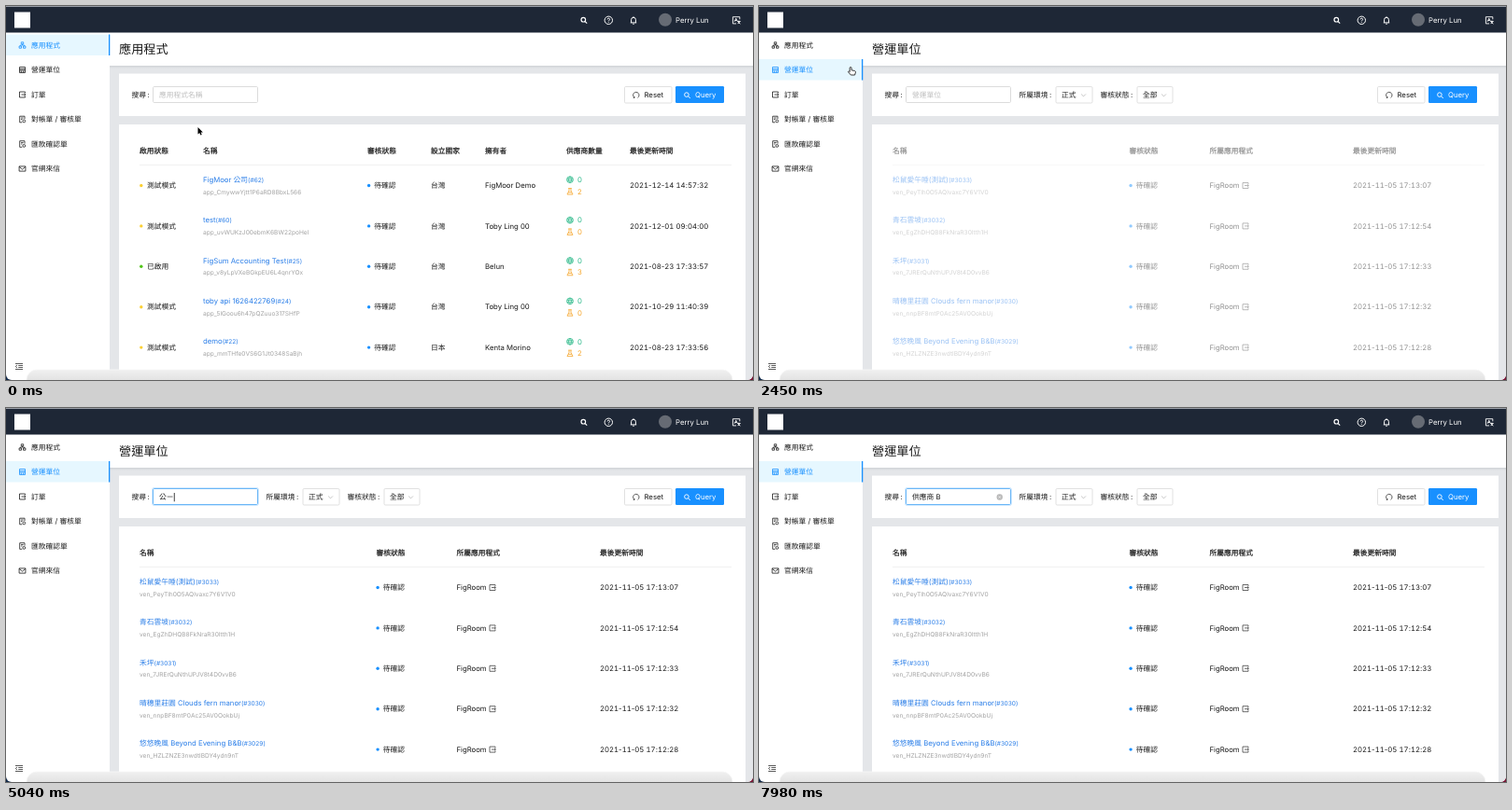
An HTML page for the animation above (8000 ms loop, 800x401 px).

```html
<!DOCTYPE html>
<html lang="zh-Hant">
<head>
<meta charset="utf-8">
<title>營運單位</title>
<style>
  html, body { margin: 0; width: 100%; height: 100%; overflow: hidden; background: #fff; }
  svg { display: block; width: 800px; height: 401px; }
  text {
    font-family: Inter, "Noto Sans CJK TC", "Noto Sans CJK JP", "Noto Sans CJK", sans-serif;
    text-rendering: geometricPrecision;
    white-space: pre;
  }
  .digits { font-variant-numeric: tabular-nums; }
</style>
</head>
<body>
<svg id="stage" viewBox="0 0 800 401"></svg>
<script>
const LOOP = 8000, BODY = 7.75, INK = '#1a1a1a', BLUE = '#1890ff', LINK = '#2a7ee8';
const ROW_TOP = 192.5, ROW_STEP = 43.4;
const MENU_TOP = 42, MENU_STEP = 26.5;

const PATHS = {
  apps: 'M-1.2-3.2h2.4v2h-2.4zM-3.4 1h2.4v2.2h-2.4zM1 1h2.4v2.2H1zM0-1.2V0M-2.2 1V0H2.2V1',
  shop: 'M-3-3H3V3H-3zM-3-1H3M-3 .6H3M-1.2 3V.6M1.2 3V.6',
  enter: 'M3-1.6V-3H-3V3H3V1.6M-1 0H3.4M2-1.3L3.4 0 2 1.3',
  doc: 'M2.5-.4V-3.3H-2.8V3.3H-.2M-1.4-1.5H1.1M-1.4 0H0M3.2 1.9a1.4 1.4 0 1 1-2.8 0a1.4 1.4 0 1 1 2.8 0',
  mail: 'M-3.4-2.6H3.4V2.6H-3.4zM-3.4-2.2L0 .6 3.4-2.2',
  search: 'M1.6-.6a2.3 2.3 0 1 1-4.6 0a2.3 2.3 0 1 1 4.6 0M1 1.1L3.2 3.3',
  help: 'M4.2 0a4.2 4.2 0 1 1-8.4 0a4.2 4.2 0 1 1 8.4 0M-1.3-.9C-1.3-2.6 1.3-2.6 1.3-.9 1.3 0 0 0 0 1M0 1.8V2.5',
  bell: 'M-3.2 2.6H3.2M-2.4 2.6V-.6a2.4 2.4 0 0 1 4.8 0V2.6M0-3V-4M-.8 3.9H.8',
  translate: 'M3.8-1V-3.6H-3.6V3.6H0M-1.8 1.4L-.2-2 1.2 1M-1.2.2H.6M1.2 1.2H4.6M2.9.4V1.2M1.6 3.8L4 1.4M2 2L4.4 3.8',
  reset: 'M-1.7 2.8A3.2 3.2 0 1 1 1.7 2.8M-2.9 3.1L-1.7 2.8-1.9 1.5',
  collapse: 'M-4-3H4M-.8-1H4M-.8 1H4M-4 3H4M-2-1.5L-3.8 0-2 1.5',
  globe: 'M3.4 0a3.4 3.4 0 1 1-6.8 0a3.4 3.4 0 1 1 6.8 0M-3.2-1H3.2M-3.2 1H3.2M0-3.4C-2-1-2 1 0 3.4 2 1 2-1 0-3.4',
  flask: 'M-1.8-3.3H1.8M-1-3.3V-.8L-3 3.2H3L1-.8V-3.3M-1.9 1H1.9',
  chevron: 'M-2.4-1.2L0 1.2 2.4-1.2'
};

const text = (x, cy, str, size = BODY, fill = INK, extra = '') =>
  `<text x="${x}" y="${cy + size * .36}" font-size="${size}" fill="${fill}" ${extra}>${str}</text>`;
const rect = (x, y, w, h, fill, extra = '') =>
  `<rect x="${x}" y="${y}" width="${w}" height="${h}" fill="${fill}" ${extra}/>`;
const dot = (x, y, r, fill, extra = '') => `<circle cx="${x}" cy="${y}" r="${r}" fill="${fill}" ${extra}/>`;
const icon = (name, x, y, color, width = .8) =>
  `<path d="${PATHS[name]}" transform="translate(${x} ${y})" fill="none" stroke="${color}" stroke-width="${width}"/>`;
const group = (id, content, extra = '') => `<g id="${id}" ${extra}>${content}</g>`;

// Equal-width digits, natural-width separators
const dateText = (x, y, str) => text(x, y, str.replace(/\d+/g, '<tspan class="digits">$&</tspan>'));
const label = (x, str) => text(x, 95.5, str + '\u2009:');
const nameCell = (x, y, name, num, code) =>
  text(x, y - 6.5, `${name}<tspan font-size="6.6">(#${num})</tspan>`, BODY, LINK) +
  text(x, y + 6.7, code, 6.6, '#a3a3a3');
const pending = (x, y) => dot(x + 1.6, y, 1.7, BLUE) + text(x + 7.3, y, '待確認');
const heads = columns =>
  columns.map(([x, str]) => text(x, 155.5, str, BODY, INK, `stroke="${INK}" stroke-width=".2"`)).join('') +
  rect(143, 170, 634, .7, '#ebebeb');
const rows = (list, draw) => list.map((row, i) => draw(ROW_TOP + i * ROW_STEP, ...row)).join('');

const appRows = rows([
  ['FigMoor 公司', 62, 'app_CmywwYjtt1P6aRD8BbxL566', 0, '台灣', 'FigMoor Demo', 2, '2021-12-14 14:57:32'],
  ['test', 60, 'app_uvWUKzJ00ebmK6BW22poHel', 0, '台灣', 'Toby Ling 00', 0, '2021-12-01 09:04:00'],
  ['FigSum Accounting Test', 25, 'app_v8yLpVXeBGkpEU6L4qnrYOx', 1, '台灣', 'Belun', 3, '2021-08-23 17:33:57'],
  ['toby api 1626422769', 24, 'app_5lGoou6h47pQZuuo317SHfP', 0, '台灣', 'Toby Ling 00', 0, '2021-10-29 11:40:39'],
  ['demo', 22, 'app_mmTHfe0VS6G1Jt0348SaBjh', 0, '日本', 'Kenta Morino', 2, '2021-08-23 17:33:56']
], (y, name, num, code, live, country, owner, count, date) =>
  dot(144.8, y, 1.7, live ? '#52c41a' : '#fbd034') + text(151, y, live ? '已啟用' : '測試模式') +
  nameCell(211, y, name, num, code) + pending(387, y) +
  text(455, y, country) + text(513, y, owner) +
  icon('globe', 604, y - 6.3, '#2bb98a') + text(612, y - 6.3, 0, BODY, '#2bb98a') +
  icon('flask', 604, y + 6.3, '#f5a52a') + text(612, y + 6.3, count, BODY, '#f5a52a') +
  dateText(668, y, date));

const unitRows = rows([
  ['松鼠愛午睡(測試)', 3033, 'ven_PeyTlh0O5AQlvaxc7Y6V1V0', '13:07'],
  ['青石雲坡', 3032, 'ven_EgZhDHQB8FkNraR30ltth1H', '12:54'],
  ['禾坪', 3031, 'ven_7JRErQuNthUPJV8t4D0vvB6', '12:33'],
  ['晴穗里莊園 Clouds fern manor', 3030, 'ven_nnpBF8mtP0Ac25AV0OokbUj', '12:32'],
  ['悠悠晚風 Beyond Evening B&amp;B', 3029, 'ven_HZLZNZE3nwdtlBDY4ydn9nT', '12:28']
], (y, name, num, code, time) =>
  nameCell(143, y, name, num, code) + pending(396.5, y) +
  text(482.5, y, 'FigRoom') + icon('enter', 521, y, '#444') +
  dateText(636, y, '2021-11-05 17:' + time));

const select = (x, w, str) =>
  rect(x, 86.5, w, 17.5, '#fff', 'rx="1.2" stroke="#d9d9d9" stroke-width=".8"') +
  text(x + 6, 95.5, str) + icon('chevron', x + w - 9.5, 95.7, '#b5b5b5');

const menu = [['apps', '應用程式'], ['shop', '營運單位'], ['enter', '訂單'],
  ['doc', '對帳單 / 審核單'], ['doc', '匯款確認單'], ['mail', '官網來信']]
  .map(([name, str], i) => {
    const y = MENU_TOP + i * MENU_STEP;
    return group('menu' + i, icon(name, 17.5, y, 'currentColor') + text(27, y, str, BODY, 'currentColor'));
  }).join('');

const stage = document.getElementById('stage');
stage.innerHTML = `
  <defs>
    <linearGradient id="desk"><stop stop-color="#10294a"/><stop offset="1" stop-color="#7a1636"/></linearGradient>
    <linearGradient id="shade" x2="0" y2="1"><stop stop-color="#cfd2d6"/><stop offset="1" stop-color="#e4e6e9"/></linearGradient>
    <linearGradient id="dock" x2="0" y2="1"><stop stop-color="#f0f0f0"/><stop offset=".4" stop-color="#e2e2e2"/></linearGradient>
    <clipPath id="window"><rect y="-10" width="800" height="411" rx="6"/></clipPath>
  </defs>
  ${rect(0, 0, 800, 401, 'url(#desk)')}
  <g clip-path="url(#window)">
    ${rect(0, 0, 800, 401, '#fff') + rect(111, 64, 689, 337, '#e4e6e9') + rect(111, 64, 689, 3, 'url(#shade)')}
    ${rect(121, 72.5, 671, 45.5, '#fff') + rect(121, 127, 671, 274, '#fff')}
    ${rect(0, 0, 800, 28.5, '#1e2736') + rect(0, 0, 800, 1, '#9a9fa7') + rect(9, 6.5, 17, 17, '#fff')}
    ${icon('search', 619, 15.3, '#fff', 1.2) + icon('help', 645.3, 15.3, '#fff', 1) + icon('bell', 672, 15.3, '#fff', 1)}
    ${dot(706, 14.7, 7, '#666b74') + text(717, 15, 'Perry Lun', BODY, '#fff') + icon('translate', 782, 15.3, '#fff', .9)}
    ${group('selection', rect(0, -11.5, 111, 22.5, '#e6f7ff') + rect(110, -11.5, 1.3, 22.5, BLUE))}
    ${menu + icon('collapse', 14, 386.5, '#333')}
    ${text(121, 46.5, '', 13.2, INK, 'id="title"')}
    ${label(134.5, '搜尋')}
    ${rect(156.5, 85.5, 114, 19, 'none', 'id="glow" rx="2" stroke="#1890ff" stroke-opacity=".2"')}
    ${rect(157.5, 86.5, 112, 17, '#fff', 'id="field" rx="1.2" stroke-width=".9"')}
    ${text(164, 95.5, '', BODY, INK, 'id="entry"')}
    ${rect(0, 91, .8, 9.3, '#111', 'id="caret"')}
    ${group('clear', dot(257.7, 95.5, 3.2, '#b8b8b8') + '<path d="M256.5 94.3l2.4 2.4m0-2.4l-2.4 2.4" stroke="#fff" stroke-width=".7"/>')}
    ${rect(662.5, 86.5, 50.5, 17.5, '#fff', 'rx="1.2" stroke="#d9d9d9" stroke-width=".8"') + icon('reset', 674.8, 95.5, '#333') + text(683.5, 95.5, 'Reset')}
    ${rect(717, 86, 52, 18, BLUE, 'rx="1.2"') + icon('search', 729.6, 95.7, '#fff', .9) + text(738, 95.5, 'Query', BODY, '#fff')}
    ${group('apps', heads([[143, '啟用狀態'], [211, '名稱'], [387, '審核狀態'], [455, '設立國家'],
      [513, '擁有者'], [600, '供應商數量'], [668, '最後更新時間']]) + appRows)}
    ${group('units',
      label(278.5, '所屬環境') + select(318, 39, '正式') + label(365.5, '審核狀態') + select(405, 38, '全部') +
      group('table', heads([[143, '名稱'], [396.5, '審核狀態'], [482.5, '所屬應用程式'], [636, '最後更新時間']]) +
        group('unitRows', unitRows)))}
    ${group('spinner', [[-1, -1], [1, -1], [1, 1], [-1, 1]].map(([x, y]) =>
      dot(x * 3, y * 3, 2.2, BLUE, `opacity="${x === y ? 1 : .7}"`)).join(''))}
    ${rect(22, 390, 756, 30, 'url(#dock)', 'rx="11" stroke="#f6f6f6" stroke-width=".8"')}
    ${group('key', rect(373, 316.5, 55, 40.5, '#1c1c1c', 'rx="8"') +
      '<path d="M399 329H406.5Q410 329 410 332.5V335.5Q410 339 406.5 339H391.5M397 332.5L390.5 339 397 345.5" fill="none" stroke="#fff" stroke-width="2.6"/>')}
  </g>
  ${group('arrow', '<path d="M0 0V7.6L1.8 6 3 8.6 4.2 8 3.1 5.6H5.4Z" stroke="#fff" stroke-width=".7" paint-order="stroke"/>')}
  ${group('hand', '<path transform="translate(1.6 4.2)" d="M-1.6-4.2c.8 0 1.1.5 1.1 1.2V-.9L2.8-.2C3.6 0 4 .5 3.8 1.4L3 4.3H-1.2L-3.9 1.2c-.5-.7.3-1.4 1-.9L-2.4.8V-3.2c0-.6.3-1 .8-1z" fill="#fff" stroke="#222" stroke-width=".9"/>')}
  ${group('beam', '<path d="M-1.6-4.4Q0-4.4 0-3.4V3.4Q0 4.4-1.6 4.4M1.6-4.4Q0-4.4 0-3.4M0 3.4Q0 4.4 1.6 4.4" fill="none" stroke="#111"/>')}`;

const el = Object.fromEntries([...stage.querySelectorAll('[id]')].map(node => [node.id, node]));
const set = (id, name, value) => el[id].setAttribute(name, value);
const show = (id, on) => set(id, 'visibility', on ? 'visible' : 'hidden');
const ramp = (t, from, to) => Math.min(1, Math.max(0, (t - from) / (to - from)));
const smooth = p => p * p * (3 - 2 * p);

// Times in ms
const HOVER = 1400, CLICK = 1750, LOADED = 2400, FOCUS = 3430, ENTER = 5950, QUERY = 6160, DONE = 6800;
const KEYS = [[FOCUS, ''], [3990, 'ㄍ'], [4200, 'ㄍㄨ'], [4410, 'ㄍㄨㄥ'], [4690, '公'], [4970, '公ㄧ'],
  [5110, '公ㄧㄥ'], [5250, '供應'], [5390, '供應ㄕ'], [5530, '供應ㄕㄤ'], [5600, '供應商'],
  [ENTER, '供應商'], [7210, '供應商 '], [7420, '供應商 B']];
const MOVES = [[600, 205.5, 130], [1330, 104.5, 65], [1600, 98, 65.5], [2600, 98, 65.5], [3300, 198, 97]];

function pointerAt(t) {
  let [, x, y] = MOVES[0];
  for (let i = 1; i < MOVES.length; i++) {
    const p = smooth(ramp(t, MOVES[i - 1][0], MOVES[i][0]));
    x += (MOVES[i][1] - MOVES[i - 1][1]) * p;
    y += (MOVES[i][2] - MOVES[i - 1][2]) * p;
  }
  return [x, y];
}

function drawMenu(t, onUnits) {
  const active = onUnits ? 1 : 0;
  set('selection', 'transform', `translate(0 ${MENU_TOP + active * MENU_STEP})`);
  for (let i = 0; i < 6; i++)
    set('menu' + i, 'color', i === active || (i === 1 && t >= HOVER) ? BLUE : INK);
}

function drawField(t, onUnits) {
  const focused = t >= FOCUS;
  const [keyTime, typed] = KEYS.findLast(([at]) => t >= at) || [0, ''];
  el.title.textContent = onUnits ? '營運單位' : '應用程式';
  el.entry.textContent = typed || (onUnits ? '營運單位' : '應用程式名稱');
  set('entry', 'fill', typed ? INK : '#bfbfbf');
  set('field', 'stroke', t >= 3250 ? '#5aaef5' : '#d9d9d9');
  show('glow', focused);
  show('caret', focused && (t - keyTime) % 1000 < 500);
  set('caret', 'x', 164.3 + (typed ? el.entry.getComputedTextLength() : 0));
  show('clear', t >= ENTER);
}

function drawTable(t, onUnits) {
  const firstLoad = onUnits && t < LOADED;
  const busy = ramp(t, QUERY, QUERY + 200) - ramp(t, DONE, DONE + 300);
  const fade = t < QUERY ? 1 - ramp(t, LOADED, LOADED + 350) : busy;
  set('apps', 'display', onUnits ? 'none' : 'inline');
  set('units', 'display', onUnits ? 'inline' : 'none');
  set('table', 'opacity', 1 - .62 * (firstLoad ? 1 : fade));
  show('unitRows', onUnits && !firstLoad);
  set('spinner', 'transform', `translate(456 251) rotate(${(t - 6300) * .3})`);
  set('spinner', 'opacity', firstLoad ? .55 : t >= QUERY ? busy * .6 : 0);
  set('key', 'opacity', ramp(t, ENTER - 70, ENTER + 70) - ramp(t, 6650, 6850));
}

function drawPointer(t) {
  const [x, y] = pointerAt(t);
  const shape = t >= 3990 ? '' : x < 109 ? 'hand' : x > 157 && x < 270 && y > 87 && y < 104 ? 'beam' : 'arrow';
  for (const id of ['arrow', 'hand', 'beam']) {
    show(id, id === shape);
    set(id, 'transform', `translate(${x} ${y})`);
  }
}

function frame() {
  const t = performance.now() % LOOP, onUnits = t >= CLICK;
  drawMenu(t, onUnits);
  drawField(t, onUnits);
  drawTable(t, onUnits);
  drawPointer(t);
  requestAnimationFrame(frame);
}
frame();
</script>
</body>
</html>
```
